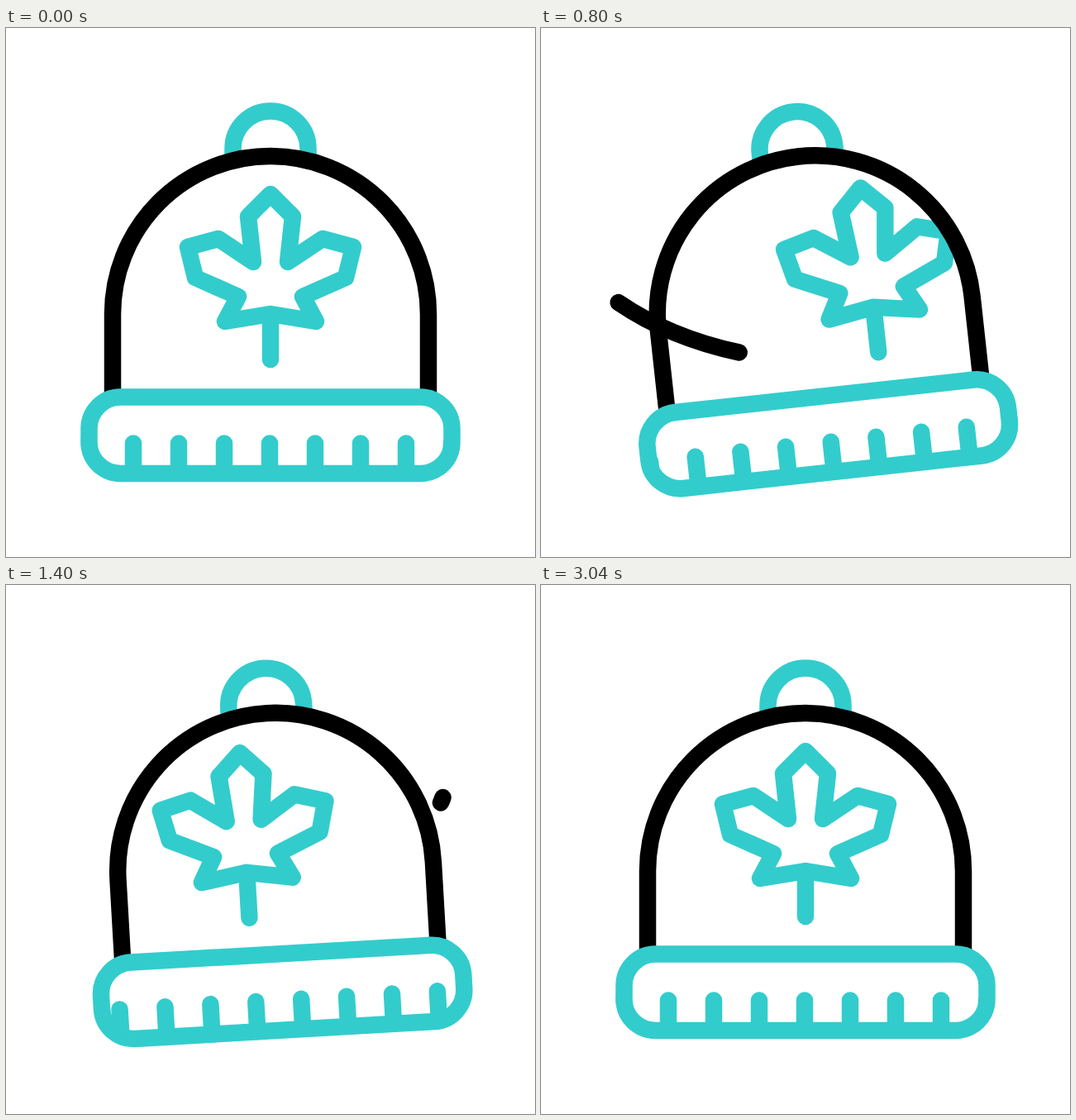
These frames come from a looping animation (640x640 px, 3600 ms). An HTML page:

```html
<!DOCTYPE html>
<html lang="en">
<head>
<meta charset="utf-8">
<title>Winter hat</title>
<style>
  html, body { margin: 0; width: 100%; height: 100%; overflow: hidden; background: #fff; }
  svg { display: block; width: 100vw; height: 100vh; }
  .teal, .black { fill: none; stroke-width: 20.5; stroke-linejoin: round; }
  .teal { stroke: #33cccc; }
  .black { stroke: #000; }
  .round { stroke-linecap: round; }
</style>
</head>
<body>
<svg viewBox="0 0 640 640">
  <defs>
    <clipPath id="inDome"><path d="M129 448V346A191 191 0 0 1 511 346V448Z"/></clipPath>
    <clipPath id="inBand"><rect x="90.5" y="436.5" width="459" height="112.5" rx="48"/></clipPath>
    <g id="leaf">
      <path d="M320 201L347 228L341 283L383 255L420 265L411 302L359 325L375 355L320 346L265 355L281 325L229 302L220 265L257 255L299 283L293 228Z"/>
      <path d="M320 350V401"/>
    </g>
  </defs>
  <g id="hat">
    <path class="teal" d="M274.5 158V146A45.5 45.5 0 0 1 365.5 146V158"/>
    <g class="teal round" clip-path="url(#inDome)">
      <use class="leaf" href="#leaf"/>
      <use class="leaf" href="#leaf"/>
    </g>
    <path class="black" d="M129 441V346A191 191 0 0 1 511 346V441"/>
    <g clip-path="url(#inBand)"><path id="ribs" class="teal round"/></g>
    <rect class="teal" x="100.5" y="446.5" width="439" height="92.5" rx="38"/>
  </g>
  <path id="lowSwoosh" class="black round" pathLength="1" d="M72 316C200 420 430 435 548 336"/>
  <path id="highSwoosh" class="black round" pathLength="1" d="M360 328C440 330 510 310 528.5 257"/>
</svg>
<script>
const LOOP = 3600, STEP = 20;
const LEAF_GAP = 397, RIB_GAP = 55;

// Each track is a list of [time in ms, value].
const tilt = [[0, 0], [585, -18.28], [640, -18.28], [980, 8.13], [1330, -4.1], [1640, 2.1], [1940, 0]];
const leafShift = [[0, 0], [360, -29], [560, -42], [800, 71], [1040, 222], [1400, 362], [1710, LEAF_GAP]];
const ribShift = [[0, 0], [360, -13], [560, -24], [800, 58], [1040, 180], [1400, 298], [1710, 6 * RIB_GAP]];
const swooshes = [
  { id: "lowSwoosh", head: [[630, 0], [800, .365], [1040, .88], [1110, 1]], tail: [[768, 0], [800, .053], [1040, .453], [1300, 1]] },
  { id: "highSwoosh", head: [[970, 0], [1040, .4], [1150, 1]], tail: [[1040, 0], [1400, .965], [1420, 1]] }
];

const $ = id => document.getElementById(id);
const leaves = document.querySelectorAll(".leaf");

// Slope at a key: flat at the ends and at turning points.
function slope(keys, i) {
  const a = keys[i - 1], b = keys[i], c = keys[i + 1];
  if (!a || !c || (b[1] - a[1]) * (c[1] - b[1]) <= 0) return 0;
  return (c[1] - a[1]) / (c[0] - a[0]);
}

function valueAt(keys, t) {
  if (t <= keys[0][0]) return keys[0][1];
  const n = keys.findIndex(k => k[0] > t);
  if (n < 0) return keys[keys.length - 1][1];
  const [t0, v0] = keys[n - 1], [t1, v1] = keys[n];
  const d = t1 - t0, s = (t - t0) / d, r = 1 - s;
  return v0 * r * r * (1 + 2 * s) + v1 * s * s * (3 - 2 * s)
    + d * s * r * (slope(keys, n - 1) * r - slope(keys, n) * s);
}

function drawRibs(shift) {
  const first = 154 + (shift % RIB_GAP) - 2 * RIB_GAP;
  let d = "";
  for (let x = first; x < 570; x += RIB_GAP) d += `M${x.toFixed(2)} 502.5V539`;
  $("ribs").setAttribute("d", d);
}

function drawSwoosh({ id, head, tail }, t) {
  const from = valueAt(tail, t), length = valueAt(head, t) - from;
  const line = $(id);
  line.style.display = length > .001 ? "" : "none";
  line.setAttribute("stroke-dasharray", `${Math.max(length, 0)} 2`);
  line.setAttribute("stroke-dashoffset", -from);
}

function draw(t) {
  $("hat").setAttribute("transform", `rotate(${valueAt(tilt, t)} 320 238)`);
  const shift = valueAt(leafShift, t);
  leaves.forEach((leaf, i) => leaf.setAttribute("x", shift - i * LEAF_GAP));
  drawRibs(valueAt(ribShift, t));
  swooshes.forEach(s => drawSwoosh(s, t));
}

const start = performance.now();
function tick() {
  const t = (performance.now() - start) % LOOP;
  draw(Math.floor(t / STEP) * STEP);
  requestAnimationFrame(tick);
}
tick();
</script>
</body>
</html>
```
